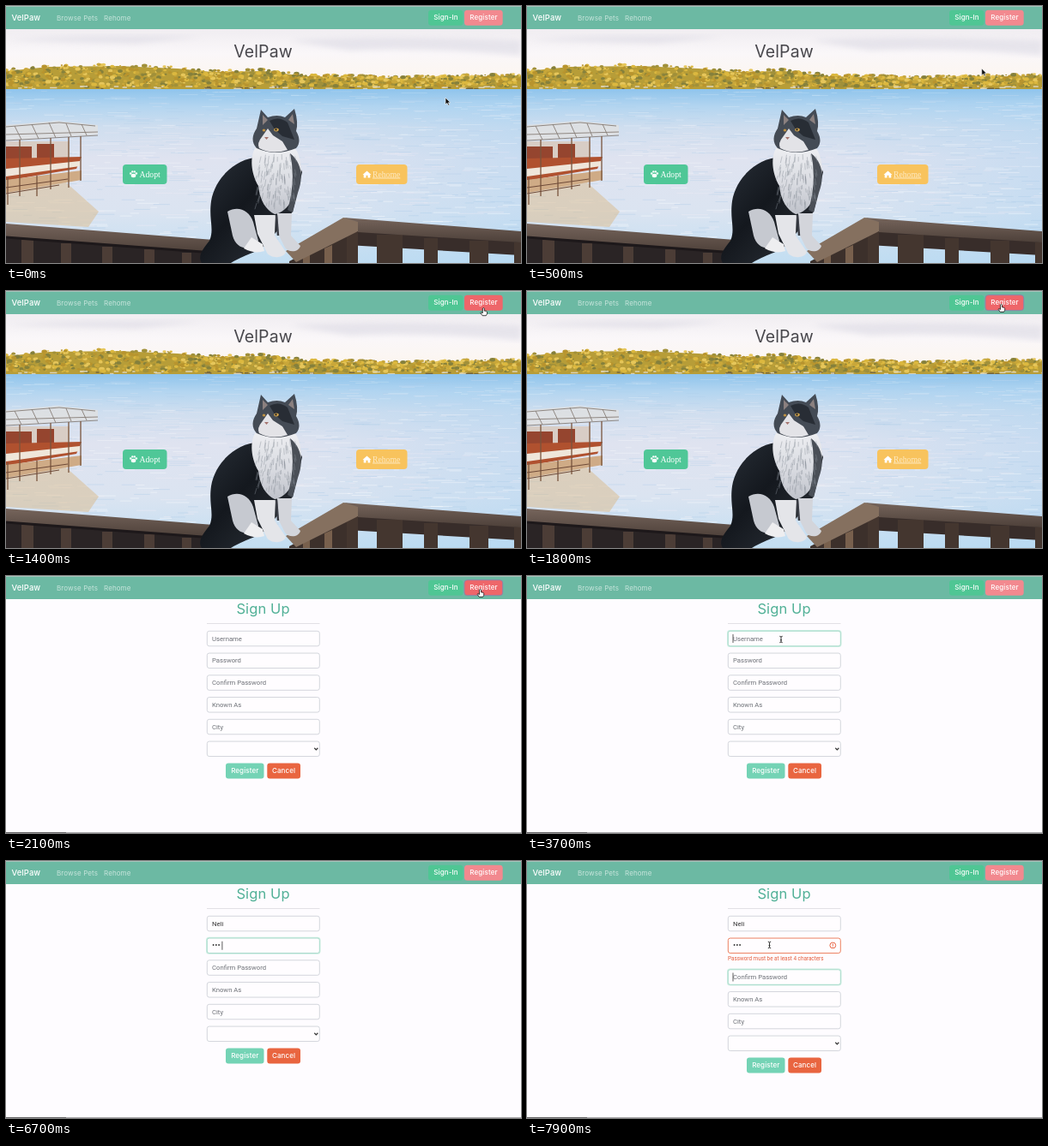
Recreate the animation shown at these times as an HTML page. Size 600 by 300 pixels, loop 8000 ms.

```html
<!DOCTYPE html>
<html lang="en">
<head>
<meta charset="utf-8">
<title>Pet adoption sign-up</title>
<style>
  html, body { margin: 0; width: 100%; height: 100%; overflow: hidden; background: #fefcff; }
  svg { display: block; width: 100vw; height: 100vh; }
  text { font-family: Inter, "Open Sans", sans-serif; font-size: 8px; letter-spacing: .1px; }
  .field { font: 7.7px Roboto, Arial, sans-serif; letter-spacing: 0; }
  .serif { font: 9.7px "Liberation Serif", "Times New Roman", serif; letter-spacing: 0; }
  .mid { text-anchor: middle; }
  .btn { font-weight: 500; fill: #fff; }
</style>
</head>
<body>
<svg viewBox="0 0 600 300" preserveAspectRatio="none">
  <defs>
    <linearGradient id="sky" x2="0" y2="1">
      <stop stop-color="#f0edf1"/><stop offset=".4" stop-color="#faf7f9"/><stop offset="1" stop-color="#fdf5ec"/>
    </linearGradient>
    <linearGradient id="lake" x2="0" y2="1">
      <stop stop-color="#8fc4ec"/><stop offset=".1" stop-color="#b3d5f0"/><stop offset=".22" stop-color="#cfdeef"/>
      <stop offset=".4" stop-color="#dfe3f0"/><stop offset=".7" stop-color="#dbe4f1"/><stop offset="1" stop-color="#c2def2"/>
    </linearGradient>
    <linearGradient id="blue"><stop offset=".55" stop-color="#a8d2f2" stop-opacity="0"/><stop offset="1" stop-color="#a8d2f2" stop-opacity=".4"/></linearGradient>
    <linearGradient id="fur" x2="1" y2="1"><stop stop-color="#2b323b"/><stop offset=".45" stop-color="#14181e"/><stop offset="1" stop-color="#30353c"/></linearGradient>
    <linearGradient id="chest" x2="0" y2="1"><stop stop-color="#eeeff2"/><stop offset=".55" stop-color="#d9dbe1"/><stop offset="1" stop-color="#bfc2ca"/></linearGradient>
    <linearGradient id="wood" x2="0" y2="1"><stop stop-color="#75645b"/><stop offset="1" stop-color="#4d4039"/></linearGradient>
    <filter id="soft"><feGaussianBlur stdDeviation=".6"/></filter>
    <filter id="haze"><feGaussianBlur stdDeviation="3"/></filter>
  </defs>
  <g id="home">
    <rect y="27" width="600" height="71" fill="url(#sky)"/>
    <path d="M330 40Q430 34 600 40V58Q480 47 400 52ZM0 40Q90 32 230 36L150 44Z" fill="#dcdae4" opacity=".6" filter="url(#haze)"/>
    <g id="trees"></g>
    <rect y="97" width="600" height="203" fill="url(#lake)"/>
    <rect y="110" width="600" height="190" fill="url(#blue)"/>
    <g id="ripples"></g>
    <g id="boat" filter="url(#soft)">
      <path d="M0 216L70 206L108 240L96 258L0 252Z" fill="#d9bd94" opacity=".55"/>
      <path d="M0 158H74V178H0Z" fill="#d8cdc5"/>
      <path d="M0 164H30V178H0ZM36 161H56V178H36Z" fill="#95452f"/>
      <path d="M0 178L88 176L82 190L0 204Z" fill="#b0512f"/>
      <path d="M0 190L86 181V187L0 199Z" fill="#efe6da"/>
      <path d="M0 203L88 192V203L0 218Z" fill="#cfab86"/>
      <path d="M0 139L60 134L107 139V150L0 157Z" fill="#e2e0df" opacity=".75"/>
      <path d="M0 141L62 136L104 140M0 150L107 147M0 157L107 151M10 140L18 156M30 138L38 155M50 136L58 154M70 137L76 152M88 138L94 151" fill="none" stroke="#867d77" stroke-width=".9"/>
      <path d="M16 156V222M52 154V214M73 153V212M87 152V204M2 200V232M36 198V222" stroke="#79553e" stroke-width="1.300"/>
      <path d="M0 212L72 202M0 219L62 209" stroke="#6e4a38"/>
    </g>
    <g id="rail" filter="url(#soft)">
      <path d="M0 268L240 286V300H0Z" fill="#2a2425"/>
      <path d="M18 273H32V300H18ZM64 277H76V300H64ZM112 281H124V300H112ZM161 284H173V300H161ZM205 288H216V300H205Z" fill="#4c3d36"/>
      <path d="M0 254L242 273V288L0 270Z" fill="url(#wood)"/>
      <path d="M0 270L242 288" stroke="#1d181a" stroke-width="3"/>
      <path d="M330 298L400 262L410 266V300H330Z" fill="#3c302b"/>
      <path d="M346 294L354 290V300H346ZM371 283L380 279V300H371Z" fill="#78604d"/>
      <path d="M398 262L600 275V291L398 279Z" fill="#382d2a"/>
      <path d="M397 264H410V300H397ZM432 267H462V300H432ZM487 271H503V300H487ZM540 274H562V300H540ZM592 276H600V300H592Z" fill="#44362f"/>
      <path d="M326 286L393 247L410 250V263L338 299Z" fill="#85705f"/>
      <path d="M393 247L600 263V276L410 264V252Z" fill="url(#wood)"/>
    </g>
    <g id="cat" filter="url(#soft)">
      <path d="M289 177C264 181 243 203 239 228C236 250 243 260 237 274C229 284 223 292 228 300H262C282 288 297 287 305 276L334 240L345 194L335 168Z" fill="url(#fur)"/>
      <path d="M258 240C270 233 283 238 288 252L294 274C285 288 268 284 264 268Z" fill="#c6c9d0"/>
      <path d="M290 166C283 180 287 198 294 210C296 228 303 238 313 243C329 241 341 218 344 190C343 178 340 169 335 164Z" fill="url(#chest)"/>
      <path d="M331 172C346 184 346 202 340 218L334 241L328 238Q338 204 331 172Z" fill="#4a4f57"/>
      <path d="M289 244H314L313 268L326 287C324 295 308 295 304 288L293 266Z" fill="#e4e5e9"/>
      <path d="M316 242H333L332 268L343 280C341 288 329 288 325 282L317 266Z" fill="#d3d5db"/>
      <path d="M286 270L299 278L301 286Q290 290 277 283Z" fill="#eeeef0"/>
      <path d="M315 244L317 268" stroke="#3a3d45" stroke-width="2.500"/>
      <path d="M297 121L305 130Q316 126 325 130L336 120Q341 136 338 146Q345 158 338 166Q314 176 292 166Q283 156 292 143Z" fill="#444b55"/>
      <path d="M299 127L305 133L299 139ZM334 126L336 138L329 133Z" fill="#8b807f"/>
      <path d="M307 134Q318 128 328 136L336 156L322 152L313 144Z" fill="#282d35"/>
      <path d="M305 143L311 151L322 158L328 168Q310 174 295 166Q292 160 298 153Z" fill="#e3e3e7"/>
      <ellipse cx="300.500" cy="145" rx="1.800" ry="1.600" fill="#bd9144"/>
      <ellipse cx="315" cy="144.500" rx="2.800" ry="1.900" fill="#cda04c"/>
      <circle cx="314.500" cy="144.300" r="1.100" fill="#15171b"/>
      <path d="M301 153h5l-2.500 3z" fill="#a5736d"/>
      <path id="hair" fill="none" stroke="#878e99" stroke-width=".8" opacity=".55"/>
    </g>
    <text class="mid" x="299.500" y="60" fill="#48474c" style="font-size:19.5px">VelPaw</text>
    <rect x="136" y="185" width="51.500" height="23" rx="4" fill="#4fc797"/>
    <g fill="#fff">
      <ellipse cx="148.500" cy="198" rx="2.800" ry="2.200"/>
      <circle cx="145.200" cy="195.500" r="1.200"/><circle cx="147.300" cy="193.400" r="1.200"/>
      <circle cx="149.800" cy="193.400" r="1.200"/><circle cx="151.900" cy="195.500" r="1.200"/>
    </g>
    <text class="serif" x="155.500" y="199.500" fill="#fff">Adopt</text>
    <rect x="408" y="185" width="59.500" height="23" rx="4" fill="#f8c35d"/>
    <path d="M415.500 197L420.500 192.500L425.500 197L424.300 197V200.500H421.500V197.800H419.500V200.500H416.700V197Z" fill="#fff"/>
    <text class="serif" x="427" y="199.500" fill="#fdeac4" text-decoration="underline">Rehome</text>
  </g>
  <g id="form"></g>
  <g id="nav">
    <rect width="600" height="27" fill="#6cb9a3"/>
    <rect width="600" height="1" fill="#a9c4bc"/>
    <text x="6.500" y="17" fill="#fff" style="font-size:9.4px;font-weight:500">VelPaw</text>
    <g fill="#fff" fill-opacity=".62"><text x="59" y="16.500">Browse Pets</text><text x="114" y="16.500" letter-spacing=".3">Rehome</text></g>
    <rect x="492" y="4.700" width="40.500" height="18" rx="3.500" fill="#4fc694"/>
    <text class="mid btn" x="512.500" y="16.300">Sign-In</text>
    <rect id="reg" x="534" y="4.700" width="44.700" height="18" rx="3.500"/>
    <text class="mid btn" x="556.500" y="16.300">Register</text>
  </g>
  <g id="cursor"></g>
</svg>
<script>
const LOOP = 8000, STEP = 100;
const $ = id => document.getElementById(id);
const lerp = (a, b, k) => a + (b - a) * k;
const clamp = k => Math.max(0, Math.min(1, k));

// Points are [key, ...values]; returns the values at key k
function along(points, k, ease = u => u) {
  const i = points.findIndex(p => p[0] > k);
  if (i < 0) return points.at(-1).slice(1);
  const a = points[i - 1], b = points[i], u = ease((k - a[0]) / (b[0] - a[0]));
  return a.slice(1).map((v, j) => lerp(v, b[j + 1], u));
}

let seed = 7;
const rnd = () => (seed = seed * 16807 % 2147483647) / 2147483647;

function paintScenery() {
  const ridge = [[0, 74], [50, 69], [130, 68], [200, 71], [240, 75], [300, 74], [350, 80], [450, 82], [520, 81], [600, 79]];
  const leaves = ['#c9a73a', '#dcb83f', '#a1903a', '#85803c', '#e6c65a', '#b8942e'];
  let trees = '<path d="M' + ridge.map(p => p[0] + ' ' + (p[1] + 2)).join('L') + 'V97H0Z" fill="#b79d38"/>';
  for (let i = 0; i < 1100; i++) {
    const x = rnd() * 600, top = along(ridge, x)[0], r = .7 + rnd() * 1.6;
    trees += `<ellipse cx="${x}" cy="${lerp(top, 94, rnd())}" rx="${r * 1.5}" ry="${r}" fill="${leaves[i % 6]}"/>`;
  }
  for (let i = 0; i < 60; i++)
    trees += `<rect x="${rnd() * 600}" y="${93 + rnd() * 3}" width="${2 + rnd() * 7}" height="1.500" fill="${i % 3 ? '#ddd3b4' : '#76663a'}"/>`;
  $('trees').innerHTML = trees;

  let ripples = '';
  for (let i = 0; i < 800; i++) {
    const y = 99 + rnd() * 175, w = 6 + rnd() * 26;
    ripples += `<rect x="${rnd() * 620 - 20}" y="${y}" width="${w}" height="${.4 + (y - 99) / 250}" fill="${['#fff', '#a9c8e6', '#efeaf2'][i % 3]}" opacity=".4"/>`;
  }
  $('ripples').innerHTML = ripples;

  // Fur: short strokes fanning down over the coat and chest
  let hair = '';
  for (let i = 0; i < 110; i++) {
    const x = 292 + rnd() * 46, y = 172 + rnd() * 58;
    hair += `M${x} ${y}l${(x - 318) / 12} ${4 + rnd() * 6}`;
  }
  $('hair').setAttribute('d', hair);
}

// Moments of the story, in ms
const OPEN = 2000, FOCUS_NAME = 3400, FOCUS_PASS = 6200, TAB = 6800;
const nameKeys = [4200, 4450, 4700, 4900], passKeys = [6400, 6500, 6600];
const route = [
  [0, 512, 107], [200, 512, 107], [900, 557, 20.5], [1300, 557, 20.5], [1700, 552.5, 15.5], [2500, 552.5, 15.5],
  [3200, 296, 74], [5600, 296, 74], [6100, 282.500, 98], [LOOP, 282.500, 98]
];
const typed = (keys, t) => keys.filter(k => k <= t).length;

function drawForm(t) {
  const name = 'Neli'.slice(0, typed(nameKeys, t));
  const pass = '•'.repeat(typed(passKeys, t));
  const bad = t >= TAB, drop = bad ? 11 : 0;
  const focus = bad ? 2 : t >= FOCUS_PASS ? 1 : t >= FOCUS_NAME ? 0 : -1;
  const last = Math.max(...[FOCUS_NAME, ...nameKeys, FOCUS_PASS, ...passKeys, TAB].filter(k => k <= t));
  const caretOn = (t - last) % 1000 < 500;
  const values = [name, pass];
  let s = `<rect width="600" height="300" fill="#fefcff"/>
    <text class="mid" x="299.500" y="44.300" fill="#50b096" style="font-size:16.5px">Sign Up</text>
    <path d="M234 55.500H365.500" stroke="#e2e0e5"/>`;
  ['Username', 'Password', 'Confirm Password', 'Known As', 'City', ''].forEach((hint, i) => {
    const y = 64 + i * 25.75 + (i > 1 ? drop : 0), value = values[i], on = i === focus;
    const edge = bad && i === 1 ? '#ea7350' : on ? '#a3d9c8' : '#cfd2d8';
    if (on) s += `<rect x="233" y="${y - 1}" width="133.500" height="20" rx="3.500" fill="#cdeee2"/>`;
    s += `<rect x="234.300" y="${y + .3}" width="131" height="17.500" rx="2.500" fill="#fffdff" stroke="${edge}" stroke-width=".9"/>
      <text class="field" x="240" y="${y + 11.600}" fill="${value ? '#333' : '#6d7177'}" ${value ? 'font-weight="500"' : ''}
        ${value && i === 1 ? 'style="font-size:9.5px"' : ''}>${value || hint}</text>`;
    if (on && caretOn) {
      const x = 240 + (value ? value.length * 3.800 + .5 : 0);
      s += `<path d="M${x} ${y + 4}V${y + 14}" stroke="#333" stroke-width=".8"/>`;
    }
    if (i === 5) s += `<path d="M359.300 ${y + 8}l2 2.200l2-2.200" fill="none" stroke="#333" stroke-width="1.200"/>`;
  });
  if (bad) s += `<g fill="none" stroke="#e96746"><circle cx="356.300" cy="98.500" r="3.400"/>
      <path d="M356.300 96.500V99M356.300 99.700V100.700"/></g>
    <text class="field" x="234" y="116.200" fill="#e55e3c" style="font-size:6.35px">Password must be at least 4 characters</text>`;
  const y = 218.500 + drop;
  s += `<rect x="256" y="${y}" width="44.500" height="18" rx="3" fill="#74d3b5"/>
    <text class="mid btn" x="278.300" y="${y + 11.600}">Register</text>
    <rect x="304.300" y="${y}" width="38.700" height="18" rx="3" fill="#e96540"/>
    <text class="mid btn" x="323.500" y="${y + 11.600}">Cancel</text>
    <path d="M0 299.500H600" stroke="#aaa8ac"/><path d="M0 299.500H70" stroke="#69686b"/>`;
  $('form').innerHTML = s;
}

const pointers = {
  arrow: '<path d="M0 0V8L1.900 6.300L3.200 9L4.500 8.400L3.300 5.800H5.700Z" fill="#111" stroke="#fff" stroke-width=".6"/>',
  hand: '<path d="M-1 0.500Q0-.7 1 .5V3.500Q4 3 4.200 5V7L3 9H-1.200L-3.500 5.800Q-3.300 4.500-1 6Z" fill="#fff" stroke="#111" stroke-width=".8"/>',
  beam: '<path d="M-1.700-3.700Q0-3.700 0-2.500Q0-3.700 1.700-3.700M0-2.500V2.500M-1.700 3.700Q0 3.700 0 2.500Q0 3.700 1.700 3.700M-1 .8H1" fill="none" stroke="#222" stroke-width=".9"/>'
};

function draw(t) {
  const onForm = t >= OPEN;
  const [x, y] = along(route, t, u => u * u * (3 - 2 * u));
  const overReg = x > 534 && x < 579 && y < 23;
  const hidden = t >= 4200 && t < 5600 || t >= 6400 && t < 7300;
  const kind = overReg ? 'hand' : onForm && y > 64 && x < 366 ? 'beam' : 'arrow';
  $('home').style.display = onForm ? 'none' : '';
  $('form').style.display = onForm ? '' : 'none';
  if (onForm) drawForm(t);

  const heat = overReg ? clamp((t - 1000) / 400) : 0;
  const mix = [[242, 238], [137, 102], [143, 106]].map(([a, b]) => Math.round(lerp(a, b, heat)));
  $('reg').setAttribute('fill', `rgb(${mix})`);
  $('reg').setAttribute('stroke', overReg && t >= 1700 ? '#8d83a8' : 'none');
  $('cursor').setAttribute('transform', `translate(${x} ${y})`);
  $('cursor').innerHTML = hidden ? '' : pointers[kind];
}

paintScenery();
const start = performance.now();
let shown = -1;
function tick() {
  const t = Math.floor((performance.now() - start) % LOOP / STEP) * STEP;
  if (t !== shown) draw(shown = t);
  requestAnimationFrame(tick);
}
draw(0);
tick();
</script>
</body>
</html>
```
